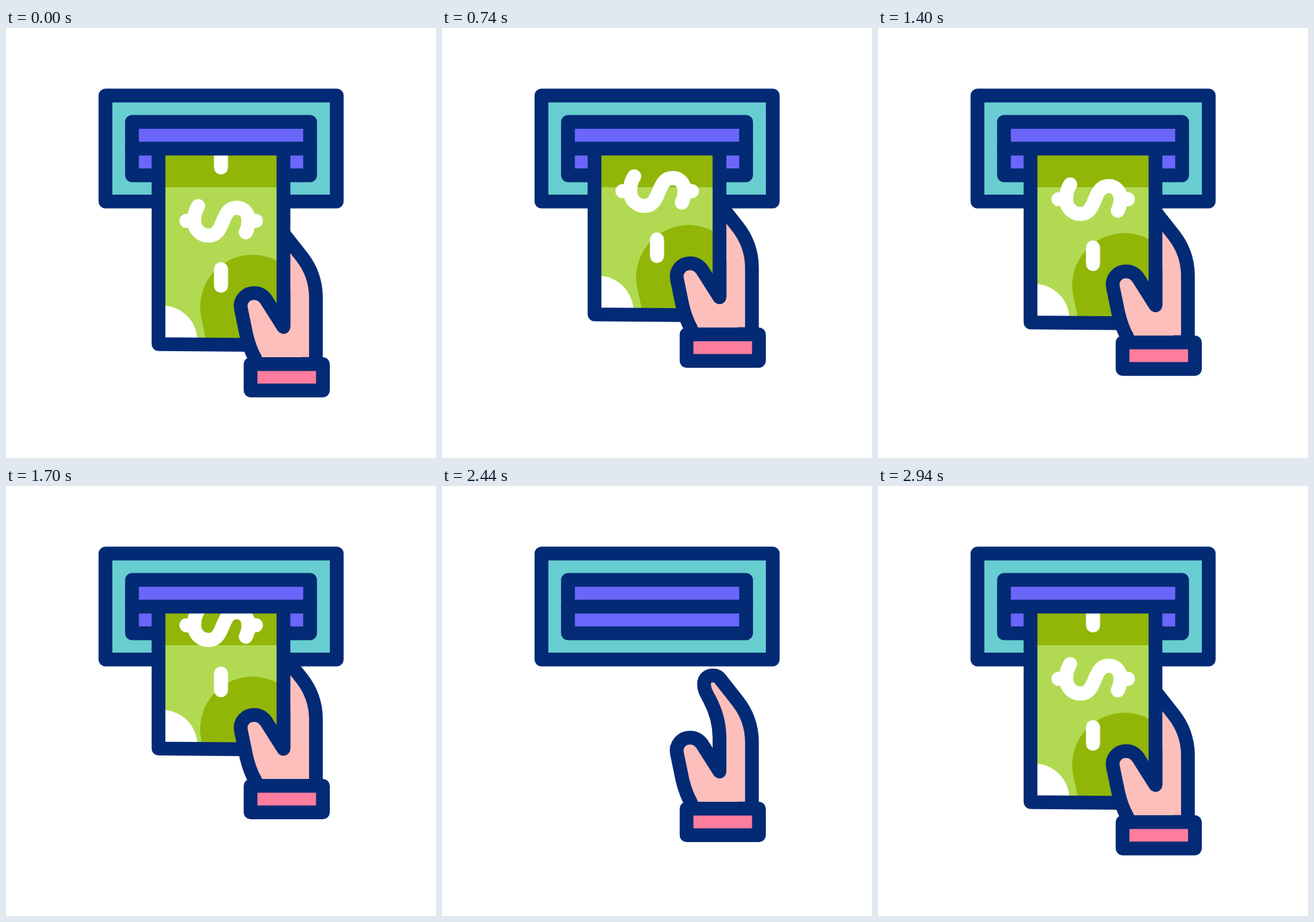
Recreate the animation shown at these times as an HTML page. Size 640 by 640 pixels, loop 3600 ms.

```html
<!DOCTYPE html>
<html lang="en">
<head>
<meta charset="utf-8">
<title>Cash machine</title>
<style>
  html, body { margin: 0; height: 100%; overflow: hidden; background: #fff; }
  svg { display: block; width: 100vw; height: 100vh; }
  .line { stroke: #032a75; stroke-width: 20.5; stroke-linejoin: round; stroke-linecap: round; }
  .mark { stroke: #fff; stroke-width: 21; stroke-linecap: round; }
  .skin { fill: #fdbfbb; }
  .shade { fill: #91b607; }
</style>
</head>
<body>
<svg viewBox="0 0 640 640" fill="none">
  <defs>
    <clipPath id="belowSlot"><path d="M0 180H640V640H0z"/></clipPath>
    <clipPath id="billArea"><path class="bill" d="M227 0H413V472L227 470.5z"/></clipPath>
  </defs>

  <!-- machine -->
  <path class="line" fill="#68cdd1" d="M148 100.5H492.3V258.2H148z"/>
  <path class="line" fill="#6b66fa" d="M187.5 139.8H452.6V219.2H187.5z"/>

  <!-- finger and palm behind the bill -->
  <path class="line skin hand" d="M413 445V395C413 370 405 350 398 337C392 326 390 322 390 315
    C390 306 396 302 403 302C408 302 412 304 414 307L440 340C455 359 461 378 461.3 400V500H371L413 445"/>

  <g clip-path="url(#belowSlot)">
    <g clip-path="url(#billArea)">
      <path fill="#b1da52" d="M217 180H423V490H217z"/>
      <path class="shade" d="M217 180H423V237H217z"/>
      <path class="hand" stroke="#91b607" stroke-width="156" stroke-linecap="round" d="M367 415.5l20 92"/>
      <g class="bill">
        <circle cx="232" cy="466" r="53" fill="#fff"/>
        <path class="mark" d="M320 183.500V207.500M320 359V383.500M268.500 287H280M361 287H372
          M286 265C282 271 280 278 280 287C280 300 290 309 302 309
          C326 309 319 267.500 343 267.500C355 267.500 361 277 361 287C361 293 360 298 357 304"/>
      </g>
    </g>
    <path class="line bill" d="M227 0V470.500L413 472V0"/>
  </g>
  <path class="line" d="M187.500 179.500H452.600"/>

  <!-- thumb and cuff in front -->
  <g class="hand">
    <path class="skin" d="M413 445L387 404C374 386 346 394 349.500 418L358 458C361 470 365 482 371 492V500H440V445z"/>
    <path class="line" d="M413 445L387 404C382 397 376 394.500 369 394.500C357 394.500 347 405 349.700 418L358 458C361 470 365 482 371 492"/>
    <path class="line" fill="#ff7d9e" d="M364 500.200H471.700V539.600H364z"/>
  </g>
</svg>
<script>
  const LOOP = 3600;
  // [time in ms, vertical offset]
  const tug = [[270, 0], [571, -57], [1136, 2], [1615, -57]];
  const handKeys = [...tug, [2095, -20], [2425, -20], [2940, 0]];
  const billKeys = [...tug, [2095, -325], [2425, -325], [2940, 0]];
  const hands = document.querySelectorAll('.hand');
  const bills = document.querySelectorAll('.bill');

  const smooth = p => p * p * (3 - 2 * p);

  function valueAt(keys, t) {
    const next = keys.findIndex(([time]) => t < time);
    if (next < 1) return 0;
    const [t0, y0] = keys[next - 1], [t1, y1] = keys[next];
    return y0 + (y1 - y0) * smooth((t - t0) / (t1 - t0));
  }

  function move(parts, y) {
    for (const part of parts) part.setAttribute('transform', `translate(0 ${y.toFixed(2)})`);
  }

  function draw() {
    const t = performance.now() % LOOP;
    move(hands, valueAt(handKeys, t));
    move(bills, valueAt(billKeys, t));
    requestAnimationFrame(draw);
  }
  draw();
</script>
</body>
</html>
```
